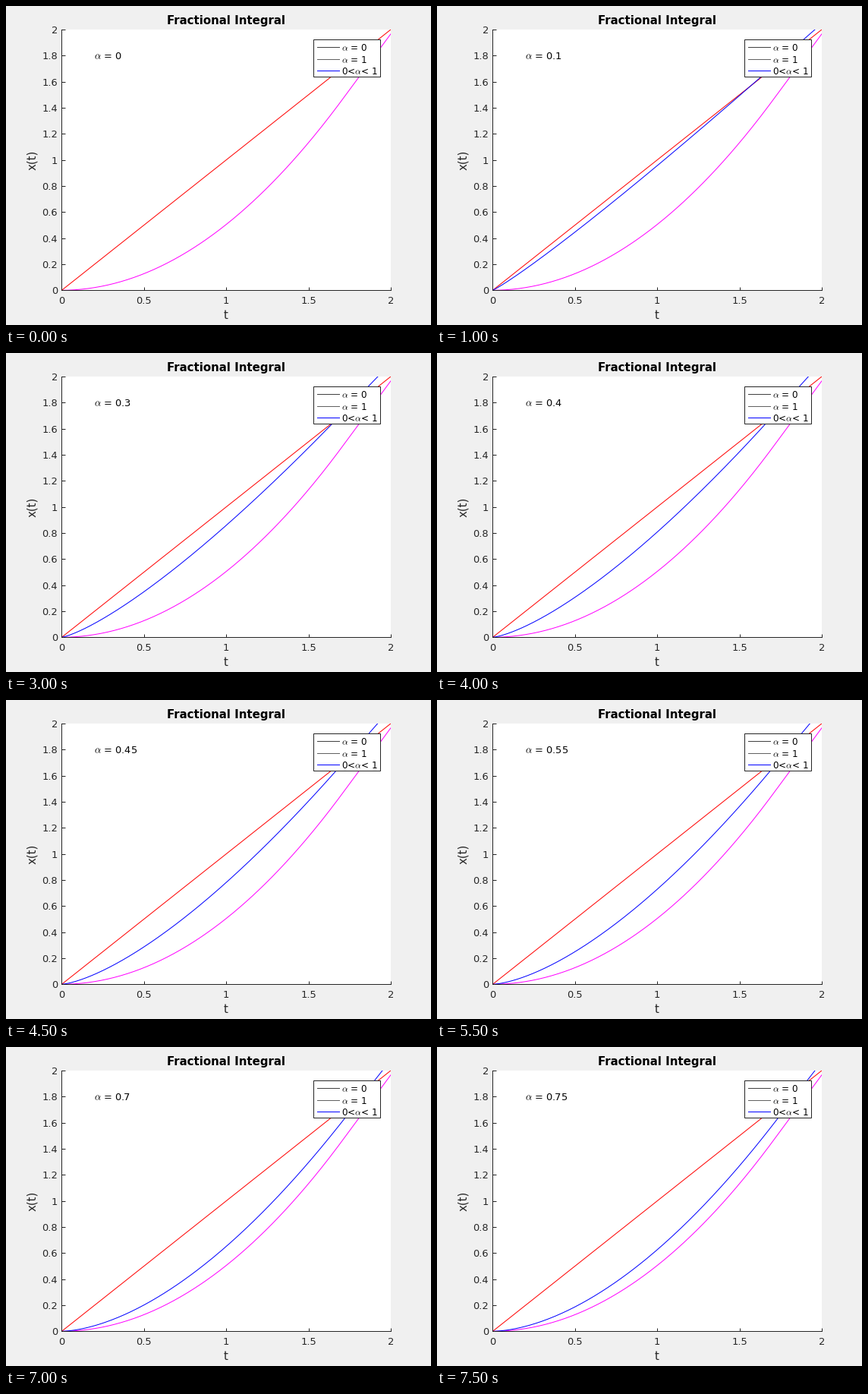
Animation, 560 px wide and 420 px high, one loop 8000 ms. Source, as a matplotlib script:

```python
import matplotlib.pyplot as plt
import numpy as np
from matplotlib.animation import FuncAnimation
from matplotlib.lines import Line2D
from matplotlib.patches import Rectangle

W, H, DPI = 560, 420, 100
LEFT, RIGHT, TOP, BOTTOM = 73.4, 507, 31, 374.3
FRAMES, INTERVAL = 16, 500
STEP, MEMORY = 0.01, 171
AXIS = "#262626"

plt.rcParams.update({"font.family": "DejaVu Sans", "mathtext.fontset": "cm"})


def pt(px):
    return px * 72 / DPI


fig = plt.figure(figsize=(W / DPI, H / DPI), dpi=DPI, facecolor="#f0f0f0")

# Page layer in pixels, origin at the top left
page = fig.add_axes([0, 0, 1, 1], zorder=2)
page.set(xlim=(0, W), ylim=(H, 0))
page.axis("off")

ax = fig.add_axes([LEFT / W, 1 - BOTTOM / H, (RIGHT - LEFT) / W, (BOTTOM - TOP) / H])
ax.set(xlim=(0, 2), ylim=(0, 2), xticks=np.arange(0, 2.1, 0.5),
       yticks=np.arange(0, 2.1, 0.2), facecolor="white")
ax.spines[["top", "right"]].set_visible(False)
for side in ("left", "bottom"):
    ax.spines[side].set(color=AXIS, linewidth=pt(1))
ax.tick_params(direction="in", length=pt(4.5), width=pt(1), color=AXIS,
               labelleft=False, labelbottom=False)


def label(x, y, text, size=13, color=AXIS, **kw):
    return page.text(x, y, text, fontsize=pt(size), color=color,
                     va="baseline", **kw)


def stroke(x, y, color):
    page.add_line(Line2D(x, y, color=color, lw=pt(1), zorder=3))


for v in ax.get_xticks():
    label(LEFT + v / 2 * (RIGHT - LEFT), 392, f"{v:g}", ha="center")
for v in ax.get_yticks():
    label(68, BOTTOM - v / 2 * (BOTTOM - TOP) + 5, f"{v:g}", ha="right")
label(289.5, 24, "Fractional Integral", 15, "black", ha="center", weight="bold")
label(290, 412, "t", 15, ha="center")
label(39, 202.5, "x(t)", 15, ha="center", rotation=90, rotation_mode="anchor")

page.add_patch(Rectangle((405, 44), 88, 49, facecolor="white", edgecolor=AXIS,
                         linewidth=pt(1), zorder=2))
for y, color, text in ((54, "#404040", r"$\alpha$ = 0"),
                       (70, "#606060", r"$\alpha$ = 1"),
                       (85, "blue", r"0<$\alpha$< 1")):
    stroke((410, 439), (y, y), color)
    label(441.5, y + 4.7, text, 12, "black", zorder=3)

t = np.arange(0, 2 + STEP / 2, STEP)


def integral(order):
    """Grunwald-Letnikov integral of x(t) = t with limited memory."""
    j = np.arange(1, MEMORY)
    weights = np.concatenate(([1.0], np.cumprod((j - 1 + order) / j)))
    return STEP ** order * np.convolve(weights, t)[:t.size]


ax.plot(t, integral(1), color="magenta", lw=pt(1))
ax.plot(t, t, color="red", lw=pt(1))
curve, = ax.plot([], [], color="blue", lw=pt(1))
readout = label(116, 70, "", color="black")


def update(i):
    order = i * 0.05
    curve.set_data(t, integral(order))
    curve.set_visible(i > 0)
    readout.set_text(rf"$\alpha$ = {order:g}")
    return curve, readout


anim = FuncAnimation(fig, update, frames=FRAMES, interval=INTERVAL,
                     init_func=lambda: update(0), repeat=True, repeat_delay=0)
plt.show()
```
